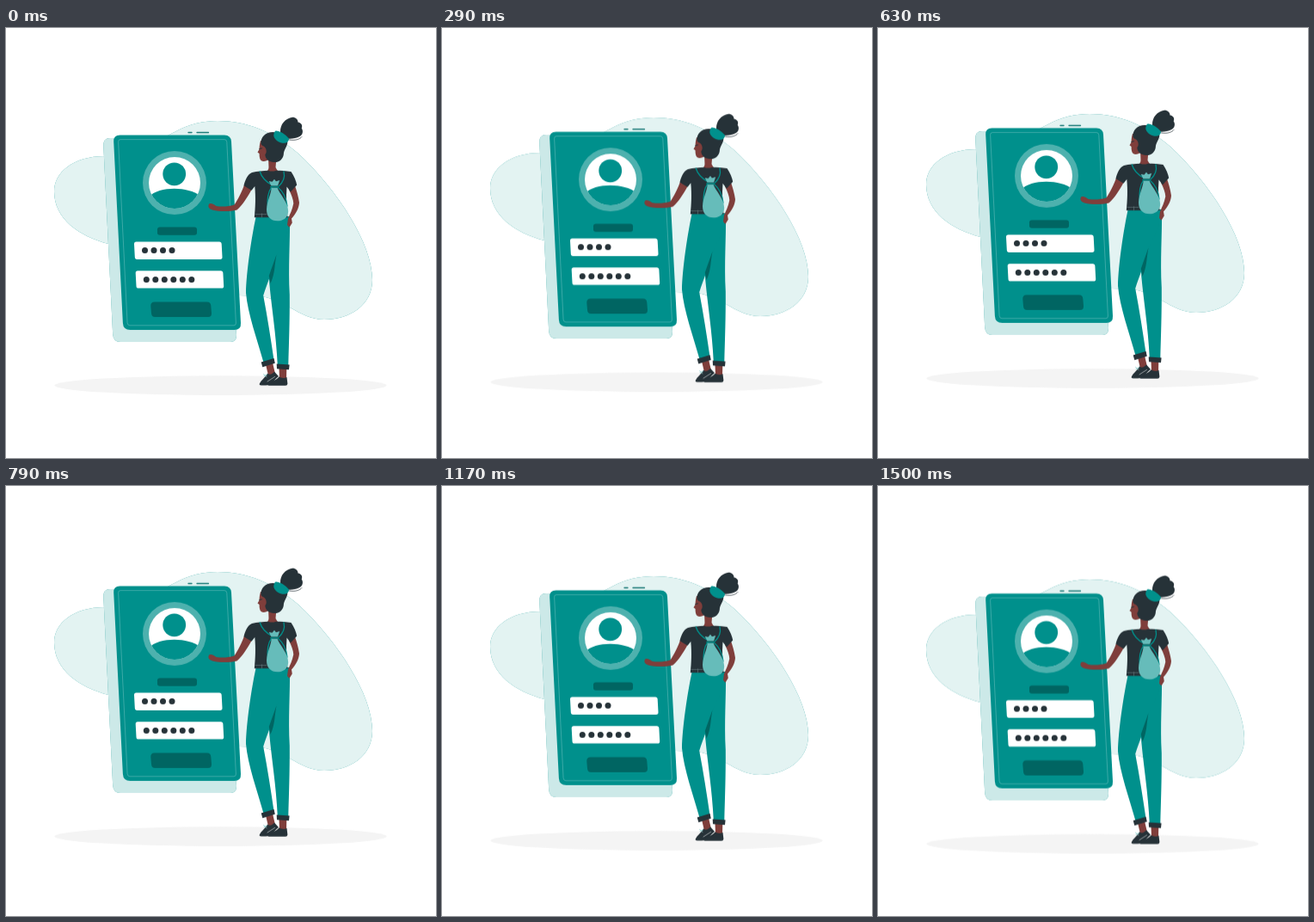
An HTML page that plays this animation: 500 px wide and 500 px high, repeating every 1.54 s.

```html
<!DOCTYPE html>
<html lang="en">
<head>
<meta charset="utf-8">
<title>Login</title>
<style>
html, body { margin: 0; width: 100%; height: 100%; overflow: hidden; background: #fff; }
svg { display: block; width: 100vw; height: 100vh; }
#scene { animation: bob 770ms linear -60ms infinite alternate; }
@keyframes bob {
  from { transform: translateY(.8px); }
  to { transform: translateY(-9.2px); }
}
.teal { fill: #00908c; }
.deep { fill: #006562; }
.pale { fill: #66bcba; }
.dark { fill: #263238; }
.skin { fill: #7f3e3b; }
.white { fill: #fff; }
.line { fill: none; stroke-linecap: round; stroke-linejoin: round; }
</style>
</head>
<body>
<svg viewBox="0 0 500 500">
<defs>
  <path id="blob" d="M56 190C56 168 78 149 115 149C160 149 176 130 196 121C214 111 230 108 246 108C280 108 310 120 340 146C385 188 426 250 426 293C426 322 400 339 370 339C340 339 322 311 285 311C210 314 180 266 119 251C85 242 56 222 56 190Z"/>
  <path id="back" d="M113.3 137Q112.8 128 121 128H250L268 357Q268 365 261 365H133Q124.8 365 124.2 356Z"/>
  <clipPath id="disc"><circle cx="196" cy="180" r="30"/></clipPath>
</defs>
<g id="scene">
  <!-- backdrop: white veils leave a thin coloured rim -->
  <use href="#blob" class="teal"/>
  <use href="#blob" class="white" opacity=".89"/>
  <ellipse cx="249.5" cy="415.6" rx="193.3" ry="11.3" fill="#f4f4f4"/>

  <!-- phone -->
  <use href="#back" class="teal"/>
  <use href="#back" class="white" opacity=".8"/>
  <path class="line" d="M212 121.5H216M222 121.5H235.5" stroke="#1a7a77" stroke-width="1.3"/>
  <path class="teal" d="M125.2 132Q124.8 124.5 132.5 124.5H254Q261.5 124.5 262 132L273 343Q273.5 351 265.5 351H144.5Q136.3 351 135.9 343Z"/>
  <path class="line" d="M130.6 132Q130.4 129.6 133 129.6H254Q256.6 129.6 256.8 132.5L267.4 343Q267.5 345.8 265 345.8H144Q141.3 345.8 141.1 343Z" stroke="#66bcba" stroke-width=".6"/>
  <circle cx="196" cy="180" r="37" fill="#4db1ae"/>
  <circle cx="196" cy="180" r="30" class="white"/>
  <circle cx="195.7" cy="169.8" r="13.4" class="teal"/>
  <path clip-path="url(#disc)" class="teal" d="M166 196C178 183.500 213 183.500 227 196V212H166Z"/>
  <rect class="deep" x="176" y="231.500" width="46" height="9.300" rx="2.800"/>
  <path id="field" class="white" d="M149 251.200Q148.900 248.500 151.500 248.500H248Q250.500 248.500 250.700 251.200L251.500 266.300Q251.600 268.900 249 268.900H152.400Q149.900 268.900 149.800 266.300Z"/>
  <use href="#field" x="1.700" y="33.700"/>
  <g id="dots" class="dark"></g>
  <path class="deep" d="M168.300 323Q168.200 318.500 172.500 318.500H234Q238 318.500 238.300 323L239 331.500Q239.200 336 235 336H173.500Q169.200 336 169 331.500Z"/>

  <!-- feet -->
  <path class="skin" d="M302 391L310 389L313 402L305 404ZM317.500 395H326.300L326 408H318Z"/>
  <path class="dark" d="M294.800 413.500C297 409 302 406 304 401.500C307 404 310 402 312 399.500L317 405C313 408 310 413 304.500 415.200Q298 416 294.800 415Z"/>
  <path class="line" d="M300 404.500L303.500 403M299.500 402.500L303 405.500" stroke="#8fcfcd" stroke-width=".8"/>
  <path class="dark" d="M304.500 414C308 410.500 314 410 317.500 405.500Q322 408 326.500 406L327.400 413.500Q327.300 415.800 325 415.800H305.500Q304 415.500 304.500 414Z"/>
  <path class="line" d="M304 411L312.500 405.500" stroke="#fff" stroke-width=".5"/>

  <!-- trousers -->
  <path class="teal" d="M302 222L330 221C330.500 248 328 278 329.800 310C330 340 329 366 328.300 392H315.800C314 355 309 327 306.300 297Z"/>
  <path class="teal" d="M290.700 219H329.500C329.500 236 322 250 314.500 264C311 280 304 296 299.200 311C304 336 308 362 311.500 386L299.500 389C292 362 281 332 279 308C279.500 284 285 246 290.700 219Z"/>
  <path class="deep" d="M314.500 263.500C312 276 313 285 307.500 297L305.800 288Z"/>
  <path class="dark" d="M296.700 388.500L311.500 384L312.800 389.700L298.300 394.300ZM314.700 390.500L329.600 391.500L329 397.200L315 396.200Z"/>

  <!-- arms -->
  <path class="skin" d="M277.500 181C275 189 270 199 265.500 205.500C258 208 250 207.800 244.500 207C241 204.500 238 203.200 236.200 204.500C234.500 207 235.500 210 240 211.500C249 213.700 260 213.500 268.500 211.500C275 206 282 195 286.500 186Z"/>
  <path class="skin" d="M329 188C332 194 334 199 334.300 204C333 211 330 217 328 221.500L327 229L329.500 231.800L332.800 226.500L332 221.500C337 216 340.500 210 341 203C340 196 338 189 335.500 182Z"/>

  <!-- neck and shirt -->
  <path class="skin" d="M305 150H314.500L313.500 162Q315 166 318 167.500H301Q305.500 166 305.500 162Z"/>
  <path class="dark" d="M286 168C292 166.500 299 166 305 165.700Q309 167.500 314 165.700C320 165.700 326 166 331.500 167C335 172 337.500 178 338.200 182.500L331 190.500L326.500 184.500C325.500 197 326 208 327.500 220.300H288.800C290 208 290.500 198 289.300 184L285.500 188.800L276.500 183.200C278 177 281 170 286 168Z"/>
  <path class="line" d="M289.500 216.500H303M297.500 215.800V220" stroke="#66797c" stroke-width=".6"/>

  <!-- bag -->
  <path class="line" d="M295.300 167C297 173 303 179 309 182.500M323 166.800C324.500 173 322.500 179 317 184M309 185C304 191 303.500 200 304.500 210M316 185C322 190 326 197 327 207" stroke="#00908c" stroke-width="1.300"/>
  <path class="pale" d="M308.700 185.500H315.500C318 193 328 202 328.200 213C328 221 322 224.300 315.500 224.300C308 224.300 303 219.500 303 211C303.500 201 308 194 308.700 185.500Z"/>
  <path class="pale" d="M308.500 183.500L305.700 178L309.500 178.700L312 175.800L314 178.300L318.200 177L316 183.500Z"/>
  <path class="line" d="M308 184.700H316" stroke="#00807c" stroke-width="1.800"/>

  <!-- head -->
  <path class="skin" d="M296 131C294.500 136 294.700 139 294.500 141L292.500 144.500L294.600 146C294.500 151 295.500 155 299.500 155C304 155 309 151 309 145L306 132Z"/>
  <path class="dark" d="M296.500 135C295.500 127 302 121 310 121C320 121 328 126 327.300 134C326 139 323 142 322.800 147C322 153 317 156.500 311.500 156C306 155.500 301.500 152.500 301.300 147C303.500 145 303 141 301 138.500C299.500 137 298 137 296.500 135Z"/>
  <path class="line" d="M294.800 140.500L297.500 139.800" stroke="#263238" stroke-width="1"/>
  <path class="dark" d="M319 121C318.500 112 325 105 333 103.800C337 103.800 339.500 106.500 339.500 109.500C343.500 110 345.200 113.500 343.700 116.500C346 119.500 345 124.500 341.500 126C336 129 327 130 323.500 127Z"/>
  <path class="line" d="M327.500 129.500C334 131.500 341.500 130 344 126.500" stroke="#263238" stroke-width=".7"/>
  <path class="teal" d="M313.500 119.500C317 119 325 123 329 128.500C329 131.500 327 133.500 324 133.800C318 134 312.500 130.500 311.300 125.500C311.200 122.500 312 120.500 313.500 119.500Z"/>
</g>
</svg>
<script>
const dots = document.getElementById('dots');
function addDots(count, x, y) {
  for (let i = 0; i < count; i++) {
    const dot = document.createElementNS('http://www.w3.org/2000/svg', 'circle');
    dot.setAttribute('cx', x + i * 10.5);
    dot.setAttribute('cy', y);
    dot.setAttribute('r', 3.5);
    dots.append(dot);
  }
}
addDots(4, 161.5, 258.4);
addDots(6, 163.3, 292.4);
</script>
</body>
</html>
```
